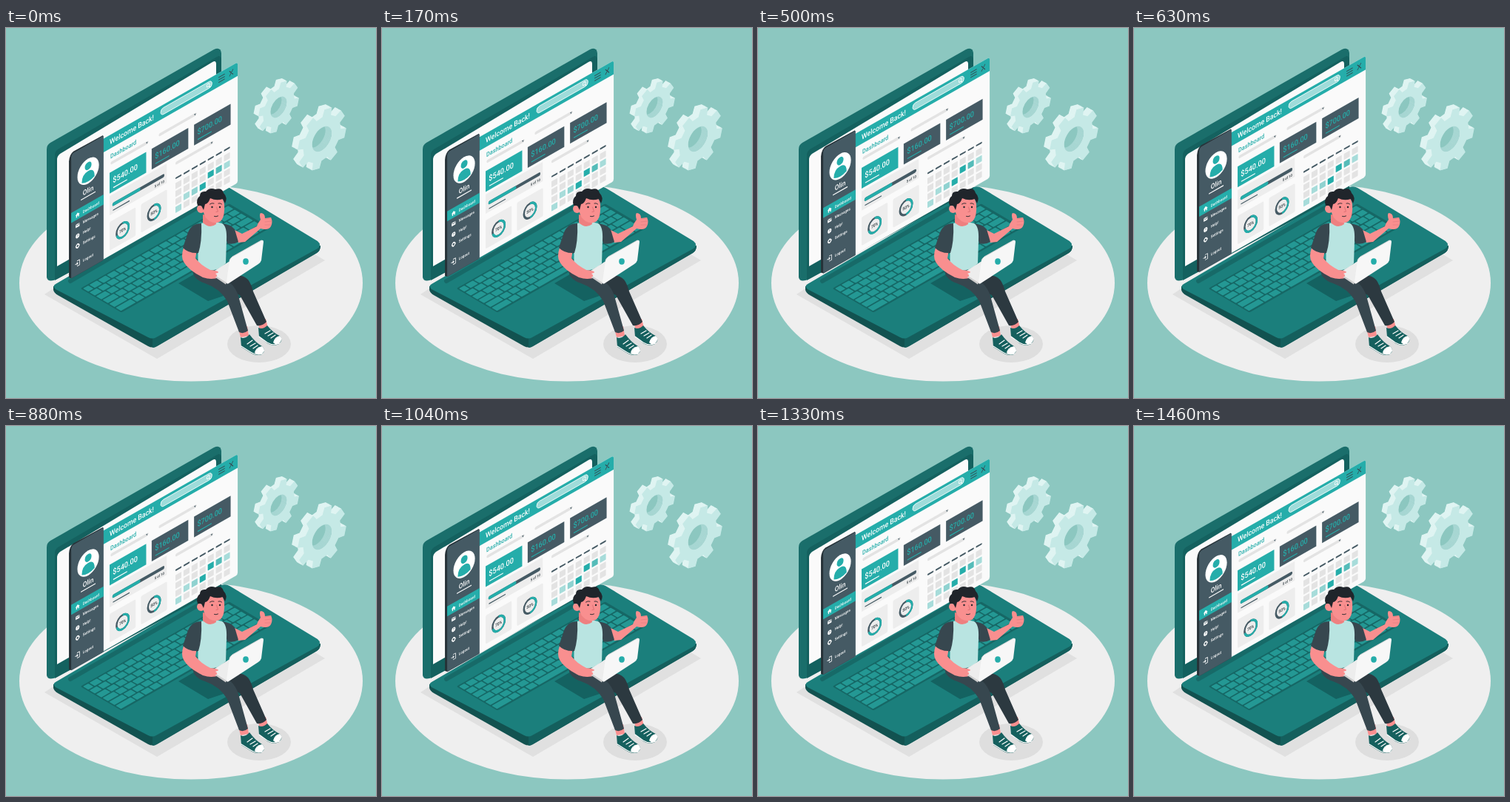
An HTML page that plays this animation: 500 by 500 pixels, repeating every 1500 ms.

```html
<!DOCTYPE html>
<html lang="en">
<head>
<meta charset="utf-8">
<title>Dashboard</title>
<style>
  html, body { margin: 0; height: 100%; overflow: hidden; background: #8cc7c0; }
  svg { display: block; width: 100vw; height: 100vh; }
  text { font-family: Roboto, sans-serif; font-weight: 500; }
  .line { fill: none; stroke-linecap: round; stroke-linejoin: round; }
</style>
</head>
<body>
<svg viewBox="0 0 500 500">
  <ellipse cx="250" cy="344.500" rx="232" ry="133" fill="#efefef"/>
  <path d="M52 360L204 447L431 314L380 284L70 348Z" fill="#e0e0e0"/>
  <ellipse cx="342" cy="427" rx="43" ry="25" fill="#dedede"/>

  <g id="gears"></g>

  <!-- laptop -->
  <path d="M64 349V354Q65 358 70 361L192 430Q198 433 204 430L420 304Q425 301 425 294Z" fill="#125250"/>
  <path d="M198 419V432Q201 432 204 430L420 304Q425 301 425 294Z" fill="#145f5d"/>
  <path d="M67 346L291 215Q297 213 302 216L421 288Q427 293 421 298L203 418Q198 421 192 418L67 353Q62 349 67 346Z" fill="#1b7f7c"/>
  <path d="M87 342L284 228" class="line" stroke="#176a68" stroke-width="6"/>
  <path d="M233 345L276 320L330 350L273 369Z" fill="#146261"/>
  <g id="keys" transform="matrix(.867 -.494 .867 .51 104 352)"></g>
  <path d="M55 164Q55 158 60 155L281 29Q290 25 291 34V218L69 339Q57 345 55 337Z" fill="#1a6e6b"/>
  <path d="M66 172Q66 167 70 164L285 39Q290 36 291 42V218L66 341Z" fill="#14615f"/>
  <path d="M69 178Q69 173 73 170L279 46Q284 43 284 49V199L69 322Z" fill="#fafafa"/>

  <!-- floating window -->
  <g id="panel">
    <g transform="matrix(.867 -.494 0 1 131 150)">
      <path d="M-53 4Q-52 -5 -46 -6L0 -5V164H-49L-53 161Z" fill="#263238"/>
      <path d="M0 0H207Q210 0 210 3V160Q210 163 207 163H0Z" fill="#fafafa"/>
      <path d="M0 0H207Q210 0 210 3V18.500H0Z" fill="#25adaa"/>
      <path d="M-49.500 164V1Q-49.500 -4 -45 -4H1V164Z" fill="#455a64"/>

      <circle cx="-23" cy="32" r="16.800" fill="#fff"/>
      <circle cx="-23" cy="25" r="5.200" fill="#25adaa"/>
      <path d="M-33 43.500Q-33 32 -23 32T-13 43.500Q-23 48.500 -33 43.500Z" fill="#25adaa"/>
      <text x="-23" y="61.300" font-size="9.500" fill="#fff" text-anchor="middle">Olin</text>
      <path d="M-34 65.500H-12" class="line" stroke="#fff" stroke-width="1.300"/>
      <path d="M-49.500 75.500H1V89H-49.500Z" fill="#25adaa"/>
      <g id="menu"></g>
      <g fill="#fff">
        <path d="M-43 83L-39.500 80L-36 83H-37.200V86H-38.700V84H-40.300V86H-41.800V83Z"/>
        <path d="M-42.500 95H-36.500V99.500H-42.500Z"/>
        <circle cx="-39.500" cy="111.500" r="3"/>
        <circle cx="-39.500" cy="125" r="2.200" fill="none" stroke="#fff" stroke-width="1.500"/>
        <path d="M-39.500 121.800V123M-39.500 127V128.200M-42.700 125H-41.500M-37.500 125H-36.300" stroke="#fff" stroke-width="1.300"/>
        <path d="M-40 145H-36.500V152H-40M-43 148.500H-39M-40.500 147L-39 148.500L-40.500 150" class="line" stroke="#fff" stroke-width=".9"/>
      </g>
      <path d="M-42 95.500L-39.500 97.500L-37 95.500" class="line" stroke="#455a64" stroke-width=".7"/>
      <text x="-39.500" y="113.300" font-size="5" text-anchor="middle" fill="#455a64">?</text>

      <text x="10.500" y="13" font-size="10" fill="#fff">Welcome Back!</text>
      <rect x="90" y="4.200" width="80" height="9" rx="4.500" fill="#9fdcda" stroke="#fff" stroke-width=".8"/>
      <path d="M165.500 10.500L167 12.300" class="line" stroke="#fff"/>
      <circle cx="164" cy="8.500" r="2.200" class="line" stroke="#fff" stroke-width=".9"/>
      <path d="M180.500 6H189.500M180.500 9.300H189.500M180.500 12.600H189.500M197.300 6L202.700 12.500M202.700 6L197.300 12.500" class="line" stroke="#37474f"/>

      <text x="11.500" y="32.500" font-size="8.400" fill="#25adaa">Dashboard</text>
      <g id="filters"></g>
      <g id="cards"></g>

      <path d="M10.400 82.500H99.500V108.500H10.400Z" fill="#ededed"/>
      <g class="line">
        <path d="M17 96.200H93.500" stroke="#455a64" stroke-width="4.600"/>
        <path d="M17 96.200H56" stroke="#25adaa" stroke-width="4.600"/>
        <path d="M16 104H41" stroke="#455a64" stroke-width="1.300"/>
      </g>
      <text x="95.500" y="105.800" font-size="4.800" text-anchor="end" fill="#263238">5 of 10</text>
      <g id="donuts"></g>
      <g id="calendar"></g>
    </g>
  </g>

  <!-- person -->
  <g>
    <path d="M340 397L351 393L354 405L343 408ZM314 406L326 403L328 416L317 418Z" fill="#f98f8f"/>
    <path d="M341 405Q347 408 353 402Q361 412 370 416Q375 422 369 427Q361 431 353 426L342 417Z" fill="#15605e"/>
    <path d="M361 425Q363 417 370 416Q375 421 369 426Q365 429 361 425Z" fill="#fff"/>
    <path d="M317 418Q323 421 329 414Q337 425 346 430Q352 436 346 441Q338 444 329 438L318 431Z" fill="#15605e"/>
    <path d="M336 439Q337 432 346 430Q352 436 346 440Q341 443 336 439Z" fill="#fff"/>
    <path d="M342 417L353 425Q361 430 370 426M318 430L329 437Q338 443 347 440M350 413L357 409M354 416L361 412M358 419L364 415M326 427L333 422M330 430L337 426M334 433L340 429" class="line" stroke="#fff" stroke-width="1.200"/>
    <path d="M290 338Q317 329 327 340Q331 345 334 356L352 397Q347 403 339 402L316 361L290 348Z" fill="#2c3940"/>
    <path d="M252 327Q253 340 269 345Q289 352 299 369L315 411Q321 414 327 409L314 362Q307 340 283 335L266 326Z" fill="#37474f"/>

    <path d="M303 278L314 290L323 289L344 271Q355 274 358 268Q361 262 358 256L350 257Q350 250 344 250Q342 252 344 259Q340 264 339 268L319 278L309 273Z" fill="#f98f8f"/>
    <path d="M350 258L358 257M350 262L359 261M350 266L358 266" class="line" stroke="#e27f80" stroke-width=".8"/>
    <path d="M291 264Q303 265 309 272L314 289Q307 293 299 291Z" fill="#37474f"/>
    <path d="M258 266Q275 259 292 264Q299 268 298 287L297 318Q282 333 258 326Q262 305 256 287Z" fill="#b9e4e1"/>
    <path d="M266 252L283 257L284 265Q275 272 266 263Z" fill="#ee8080"/>
    <path d="M240 297Q236 309 240 316Q246 327 266 337Q278 341 288 337L290 330L278 328Q262 320 256 311L258 300Z" fill="#f98f8f"/>
    <path d="M264 264Q251 264 246 276L239 297Q247 305 260 304Q265 289 264 264Z" fill="#37474f"/>

    <path d="M277 331L304 314L322 324L298 345Z" fill="#ededed"/>
    <path d="M277 331V333L297 346.500L298 344Z" fill="#cfcfcf"/>
    <path d="M302 314Q303 311 306 309L345 287Q348 286 348 289L345 314Q344 317 341 319L301 345Q298 347 298 343Z" fill="#f7f7f7"/>
    <path d="M302 314Q303 311 306 309L345 287" class="line" stroke="#d8d8d8" stroke-width="1"/>
    <ellipse cx="324" cy="315.500" rx="3.800" ry="4.200" fill="#25adaa"/>
    <path d="M270 329Q277 326 285 328.500Q290 330 283 332Q288 335 282 337Q275 340 267 336Z" fill="#f98f8f"/>

    <path d="M266 234Q268 225 281 225Q293 226 295 238Q296 254 291 260Q285 266 275 261Q268 256 267 249Q260 252 258 245Q258 238 265 241Z" fill="#f98f8f"/>
    <path d="M259 240Q256 231 262 227Q262 220 270 221Q275 215 283 218Q292 215 294 223Q300 229 296 237L293 231Q284 234 276 230Q273 238 269 238L267 246L264 240Z" fill="#20252b"/>
    <circle cx="278.500" cy="242" r="1.200" fill="#20252b"/>
    <circle cx="289" cy="242" r="1.200" fill="#20252b"/>
    <path d="M275.500 238Q278 236 281 237M287 237Q289.500 236 291.500 238M281.500 254.500Q284 255.500 286.500 254" class="line" stroke="#20252b" stroke-width=".9"/>
    <path d="M284.500 242L286.500 248L284 248.500" class="line" stroke="#d96f72" stroke-width=".9"/>
  </g>
</svg>
<script>
const $ = id => document.getElementById(id);
const TEAL = '#25adaa', DARK = '#455a64', LIGHT = '#a7dcda', GREY = '#e3e3e3';
const rect = (x, y, w, h, fill, r = 0) =>
  `<rect x="${x}" y="${y}" width="${w}" height="${h}" rx="${r}" fill="${fill}"/>`;
const label = (x, y, size, fill, text, anchor = 'start') =>
  `<text x="${x}" y="${y}" font-size="${size}" fill="${fill}" text-anchor="${anchor}">${text}</text>`;

// Extruded gear: stacked slices with the lit face on top
function gear(cx, cy, radius, depth) {
  const teeth = 8, step = Math.PI * 2 / teeth, hole = radius * .4;
  const point = (angle, k) =>
    `${(Math.cos(angle) * radius * k).toFixed(2)} ${(Math.sin(angle) * radius * k).toFixed(2)}`;
  const outline = Array.from({ length: teeth }, (_, i) =>
    [[-.3, .76], [-.2, .99], [.2, .99], [.3, .76]]
      .map(([offset, k]) => point((i + offset) * step + .26, k)).join('L')).join('L');
  const d = `M${outline}ZM${-hole} 0a${hole} ${hole} 0 1 0 ${2 * hole} 0a${hole} ${hole} 0 1 0 ${-2 * hole} 0Z`;
  let layers = '';
  for (let z = depth; z >= 0; z -= .5) {
    const wall = z ? `<circle r="${hole}" fill="none" stroke="#a6d6d2" stroke-width="1.500"/>` : '';
    layers += `<g transform="matrix(.867 -.494 0 1 ${cx - z} ${cy - z * .55})">
      <path d="${d}" fill-rule="evenodd" fill="${z ? '#dff4f2' : '#c5e9e6'}"/>${wall}</g>`;
  }
  return layers;
}
$('gears').innerHTML = gear(368.5, 107, 32.2, 6.5) + gear(427, 150, 38.5, 8);

let keys = rect(-2, -2, 232, 64, '#166765', 2);
for (let row = 0; row < 6; row++) {
  let x = 0;
  for (let i = 0; x < 227; i++) {
    const wide = row === 5 && i === 4 ? 70 : i ? 13.5 : 10 + row * 3;
    const width = 228 - x - wide < 9 ? 228 - x : wide;
    keys += rect(x, row * 10.2, width - 1.8, 8.3, '#249894', 1);
    x += width;
  }
}
$('keys').innerHTML = keys;

$('menu').innerHTML = [['Dashboard', 85], ['Messages', 99], ['Help!', 113], ['Settings', 127], ['Logout', 150.5]]
  .map(([text, y]) => label(-31.5, y, 5.3, '#fff', text)).join('');

$('filters').innerHTML = [[12, 39], [87, 38], [113, 89]].map(([x, y]) =>
  rect(x, y - 2, 59, 4, GREY, 2) + `<path d="M${x + 55} ${y - 1}h3l-1.500 2.200Z" fill="${DARK}"/>`).join('');

$('cards').innerHTML = [[10.4, '$540.00', TEAL, '#fff'], [76, '$160.00', DARK, TEAL], [142, '$700.00', DARK, TEAL]]
  .map(([x, text, fill, ink]) => rect(x, 50.8, 57, 28, fill) +
    label(x + 5, 67.2, 10.5, ink, text) + rect(x + 5.5, 73, 22, 1.3, ink, .6)).join('');

$('donuts').innerHTML = [[30.7, 70], [79.6, 50]].map(([x, percent]) => {
  const ring = (color, extra = '') => `<circle cx="${x}" cy="138.300" r="9.500" fill="none" stroke="${color}"
    stroke-width="2.800" pathLength="100" ${extra} transform="rotate(-90 ${x} 138.300)"/>`;
  return rect(x - 20.3, 117.5, 40.6, 38.5, '#ededed', 2) + ring(DARK) +
    ring(TEAL, `stroke-dasharray="${percent} 100"`) + label(x, 140.4, 5.8, '#263238', percent + '%', 'middle');
}).join('');

const marked = { '1,4': TEAL, '1,5': '#55bcb9', '1,6': LIGHT, '2,1': LIGHT, '2,2': '#8fd2d0', '2,3': TEAL, '3,0': LIGHT };
let calendar = '';
for (let col = 0; col < 7; col++) {
  const x = 113 + col * 12.6;
  calendar += rect(x, 108, 9.5, 2.2, DARK, 1);
  for (let row = 0; row < 4; row++)
    calendar += rect(x, 115.5 + row * 10.7, 9.3, 8.2, marked[[row, col]] || GREY, .6);
}
$('calendar').innerHTML = calendar;

const PERIOD = 1500, LIFT = 10;
function draw() {
  const phase = performance.now() % PERIOD / PERIOD;
  $('panel').setAttribute('transform', `translate(0 ${-LIFT * (1 - Math.abs(1 - 2 * phase))})`);
  requestAnimationFrame(draw);
}
draw();
</script>
</body>
</html>
```
